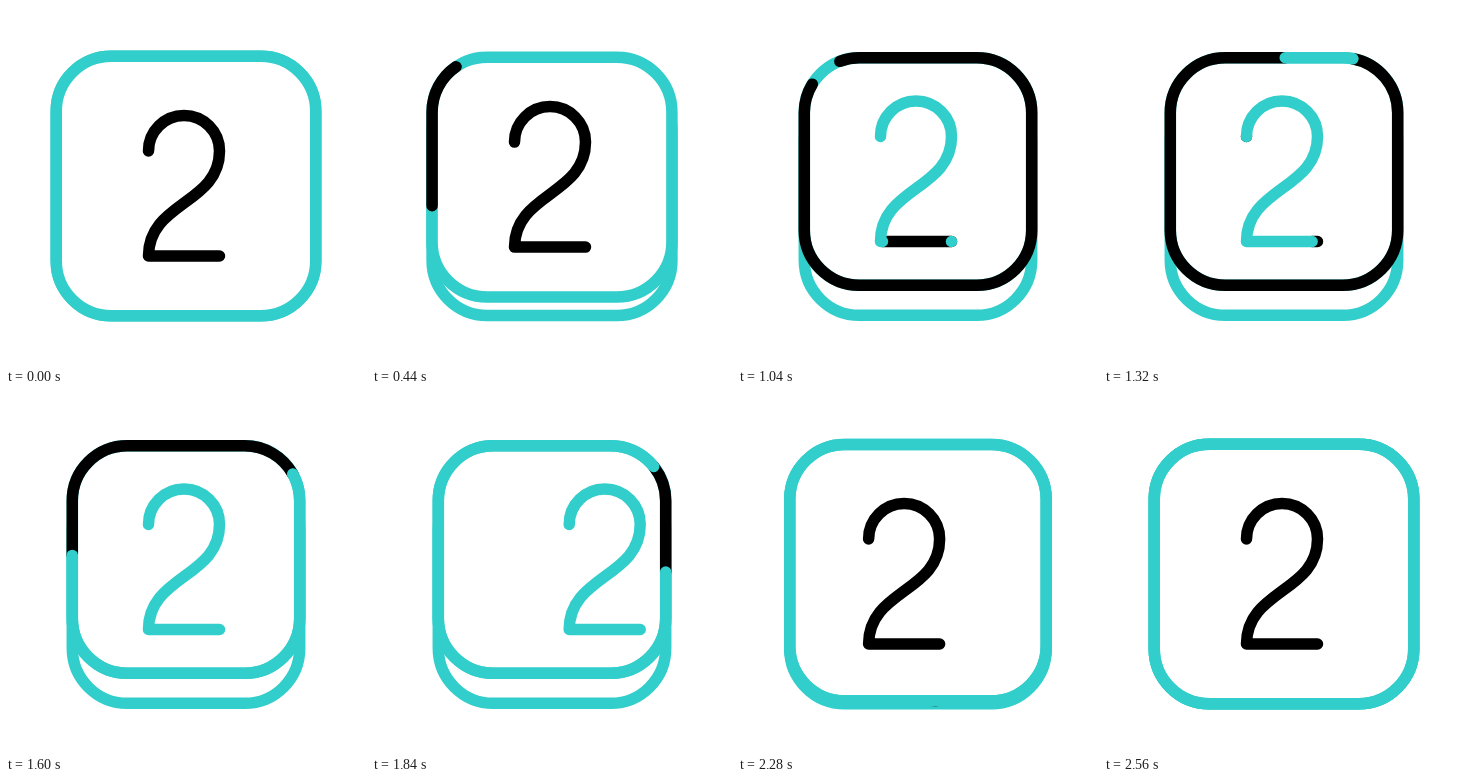
An HTML page for the animation above (2.8 s loop, 360x360 px).

```html
<!DOCTYPE html>
<html lang="en">
<head>
<meta charset="utf-8">
<title>Number key</title>
<style>
  html, body { margin: 0; height: 100%; overflow: hidden; background: #fff; }
  svg { display: block; width: 100vw; height: 100vh; }
  path { fill: none; stroke-width: 11.5; stroke-linecap: round; stroke-linejoin: round; }
  .teal { stroke: #32cecb; }
  .black { stroke: #000; }
  #face { fill: #fff; }
</style>
</head>
<body>
<svg viewBox="0 0 360 360">
  <defs>
    <path id="two" pathLength="1" d="M142.5 145a35.5 35.5 0 0 1 71 0C213.5 198 142.5 196 142.5 250H213.5"/>
    <clipPath id="clip"><path id="clipShape"/></clipPath>
  </defs>
  <path id="base" class="teal"/>
  <path id="face" class="teal"/>
  <g clip-path="url(#clip)">
    <g id="leaving">
      <use href="#two" class="black" id="twoRest"/>
      <use href="#two" class="teal" id="twoFill"/>
    </g>
    <use href="#two" class="black" id="entering"/>
  </g>
  <path id="blackRing" class="black" pathLength="1"/>
  <path id="tealRing" class="teal" pathLength="1"/>
</svg>
<script>
const LOOP = 2800, STEP = 40, SPACING = 205, RADIUS = 55;
const el = id => document.getElementById(id);
const progress = (t, from, to) => Math.min(1, Math.max(0, (t - from) / (to - from)));
const smooth = u => u * u * (3 - 2 * u);

// cubic-bezier(.33, 0, .2, 1): a long, soft ending
function settle(x) {
  let lo = 0, hi = 1;
  for (let i = 0; i < 24; i++) {
    const u = (lo + hi) / 2, v = 1 - u;
    if (.99 * u * v * v + .6 * u * u * v + u * u * u < x) lo = u; else hi = u;
  }
  return smooth(lo);
}

// Rounded square drawn clockwise from the left end of its top edge
function roundedSquare(size, bottom) {
  const r = RADIUS, side = size - 2 * r;
  const arc = (x, y) => `a${r} ${r} 0 0 1 ${x} ${y}`;
  return `M${180 - side / 2} ${bottom - size}h${side}${arc(r, r)}v${side}${arc(-r, r)}` +
    `h${-side}${arc(-r, -r)}v${-side}${arc(r, -r)}z`;
}

function trim(node, start, length) {
  const full = length > .9999;
  node.style.display = length > .0001 ? "" : "none";
  node.style.strokeDasharray = full ? "none" : `${length} ${1 - length}`;
  node.style.strokeDashoffset = full ? 0 : -(start % 1);
}

const shift = (node, x, y) => node.setAttribute("transform", `translate(${x} ${y})`);

function draw(t) {
  const raised = smooth(progress(t, 60, 720)) - settle(progress(t, 1992, 2445));
  const size = 259.5 - 32.1 * raised;
  const lift = -14.5 * raised;
  const face = roundedSquare(size, 180 + size / 2 + lift);

  el("base").setAttribute("d", roundedSquare(size, 309.75 - .4 * raised));
  for (const id of ["face", "clipShape", "blackRing", "tealRing"]) el(id).setAttribute("d", face);

  // Black runs round the edge first, then teal takes its place
  const black = settle(progress(t, 232, 1329));
  const teal = settle(progress(t, 1155, 2335));
  const tealStart = .0005075 * Math.max(0, t - 1175);
  trim(el("tealRing"), tealStart, teal);
  if (teal > 0) trim(el("blackRing"), tealStart + teal, 1 - teal);
  else trim(el("blackRing"), .792 + .000306 * (t - 440), black);

  const filled = settle(progress(t, 635, 1460));
  trim(el("twoFill"), 0, filled);
  trim(el("twoRest"), filled, 1 - filled);

  const slide = SPACING * settle(progress(t, 1625, 2555));
  shift(el("leaving"), slide, lift);
  shift(el("entering"), slide - SPACING, 0);
}

function tick() {
  const t = performance.now() % LOOP;
  draw(Math.floor(t / STEP) * STEP);
  requestAnimationFrame(tick);
}
tick();
</script>
</body>
</html>
```
